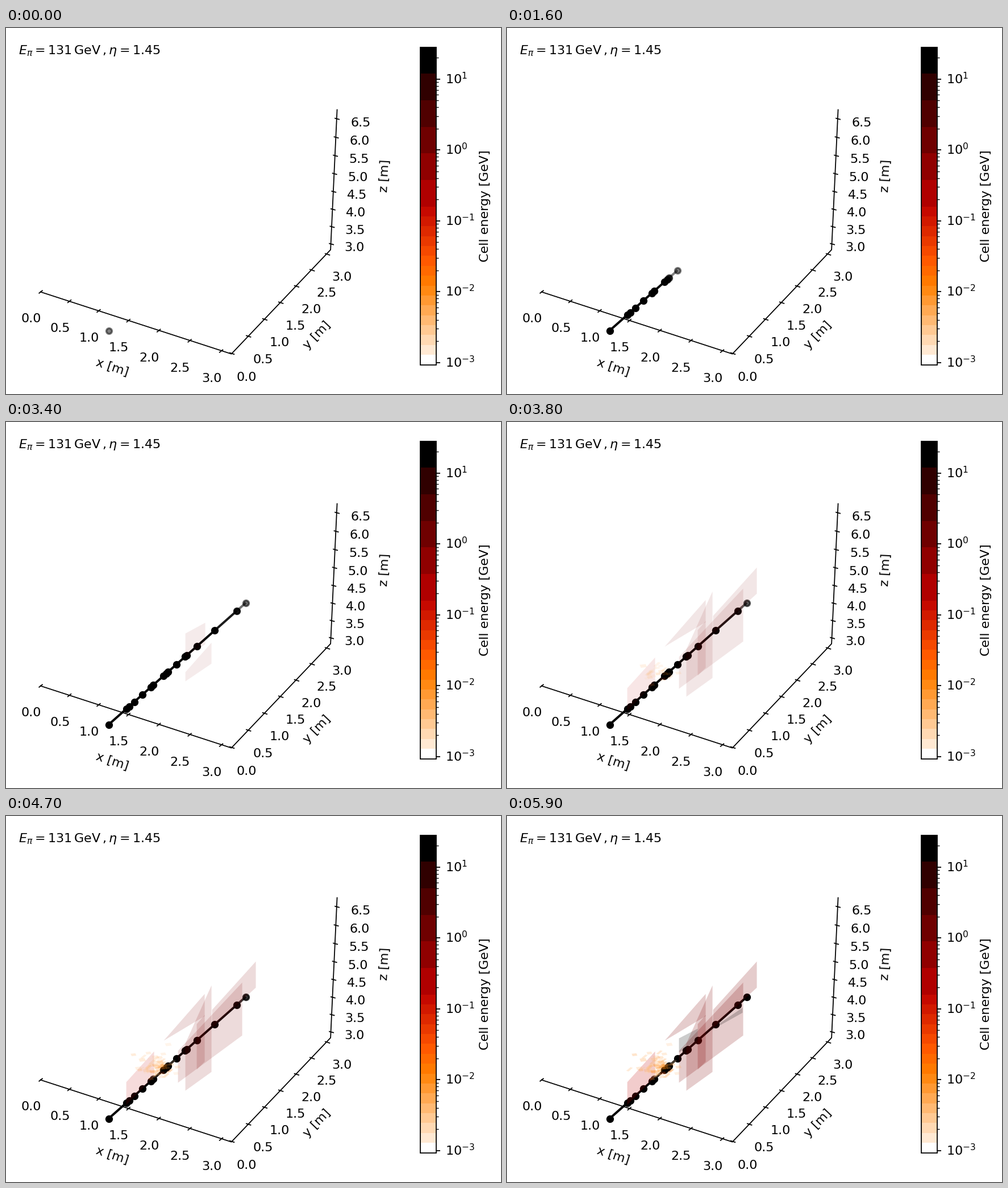
Animation of 871 by 643 pixels, one loop 6900 ms. Source, as a matplotlib script:

```python
import numpy as np
import matplotlib.pyplot as plt
from matplotlib.animation import FuncAnimation
from matplotlib.patches import Polygon, Rectangle

W, H, DPI = 871, 643, 160
FRAMES, LAST = 69, 59
STAGE = 7                     # steps per stage
CELLS_FROM = 31               # first step with cells

plt.rcParams["font.family"] = "DejaVu Sans"
plt.rcParams["font.size"] = 10
plt.rcParams["mathtext.fontset"] = "dejavusans"
heat = plt.get_cmap("gist_heat_r")

fig = plt.figure(figsize=(W / DPI, H / DPI), dpi=DPI, facecolor="white")
ax = fig.add_axes([0, 0, 1, 1])
ax.set_xlim(0.4, W + 0.4)
ax.set_ylim(H + 0.4, 0.4)
ax.axis("off")


def stroke(p, q, width=0.8, **kw):
    return ax.plot([p[0], q[0]], [p[1], q[1]], color="black", lw=width,
                   solid_capstyle="butt", **kw)


def mix(a, b, t):
    return (1 - t) * np.array(a, float) + t * np.array(b, float)


def draw_axis(ticks, numbers, values, depth, arm):
    """Ticks and numbers of one axis, spaced in perspective."""
    for t, value in zip(np.linspace(0, 1, len(values)), values):
        s = t / (depth + (1 - depth) * t)
        tick, (x, y) = mix(*ticks, s), mix(*numbers, s)
        stroke(tick - arm, tick + arm)
        ax.text(x, y + 8.2, f"{value:.1f}", ha="center", va="baseline")


def draw_axes():
    ax.plot([61, 397, 571.5, 583], [464, 573, 390, 144], color="black", lw=0.8)
    short, tall = np.arange(0, 3.1, 0.5), np.arange(3, 6.6, 0.5)
    draw_axis([(61.5, 464), (379, 568)], [(45, 509), (362, 614.5)],
              short, 1.058, np.array([3.5, -2.8]))
    draw_axis([(398, 572.3), (566, 398)], [(424, 612), (591, 436)],
              short, 0.953, np.array([4.6, 1.5]))
    draw_axis([(573, 380), (583, 160)], [(613, 384), (624.5, 165)],
              tall, 1.044, np.array([4.4, 1.2]))
    for x, y, name, angle in [(187, 597, "x", -18), (548, 540, "y", 46.3),
                              (667, 260, "z", 87.2)]:
        ax.text(x, y, f"{name} [m]", rotation=angle, ha="center", va="center",
                rotation_mode="anchor")
    ax.text(22, 46, r"$E_\pi = 131\,\mathrm{GeV}\,, \eta = 1.45$")


def draw_colorbar():
    left, right, top, bend, bottom = 729, 757, 34, 314, 592
    # fine colour steps below the bend, coarse ones above
    edges = np.r_[np.linspace(bottom, bend, 17), np.linspace(bend, top, 7)[1:]]
    for low, high in zip(edges, edges[1:]):
        t = (bottom - (low + high) / 2) / (bottom - top)
        t = 0.0 if low == bottom else 1.0 if high == top else t
        ax.add_patch(Rectangle((left, high), right - left, low - high,
                               fc=heat(t), lw=0, antialiased=False))
    ax.add_patch(Rectangle((left, top), right - left, bottom - top,
                           fc="none", ec="black", lw=0.8, zorder=2))
    decade = 124.5
    for n in range(-3, 2):
        y = 214.5 - decade * n
        stroke((right, y), (right + 7.8, y))
        ax.text(773, y + 8.4, f"$\\mathdefault{{10^{{{n}}}}}$", va="baseline")
        for minor in y - decade * np.log10(np.arange(2, 10)):
            if minor > top:
                stroke((right, minor), (right + 4.4, minor), 0.6)
    ax.text(843.5, 313, "Cell energy [GeV]", rotation=90, ha="center",
            va="center")


def build_track():
    """Hits on a straight line, four per stage."""
    along = [0, 0.128, 0.149, 0.186, 0.244, 0.308, 0.323, 0.398, 0.418, 0.433,
             0.495, 0.557, 0.569, 0.642, 0.772, 0.934, 1]
    hits = [mix((181, 532), (422.5, 318), s) for s in along]
    parts = []
    for i, hit in enumerate(hits):
        artists = ax.plot(*hit, "o", color="black", ms=20 ** 0.5, mew=1.5,
                          zorder=3)
        if i:
            artists += stroke(hits[i - 1], hit, 1.8, zorder=2)
        birth = STAGE * (i // 4) + round(STAGE * (i % 4 / 4) ** 1.5)
        parts.append((artists, birth))
    return parts


def cell(points, color, birth, death=FRAMES, peak=0.2):
    patch = Polygon(points, closed=True, fc=color, lw=0, zorder=4)
    ax.add_patch(patch)
    return patch, birth, death, peak


def plate(left, right, *style):
    """Upright cell face; each side is (x, top, bottom)."""
    (x0, top0, low0), (x1, top1, low1) = left, right
    return cell([(x0, low0), (x0, top0), (x1, top1), (x1, low1)], *style)


def large_cells():
    dark, full = "#800000", CELLS_FROM + 5
    return [
        plate((316, 372, 412), (351, 353, 391), dark, CELLS_FROM, full),
        plate((316, 440, 456), (362, 388, 425), dark, CELLS_FROM, full),
        plate((303, 413, 469), (416, 293, 386), dark, full),
        plate((278, 395, 395), (350, 313, 352), dark, full),
        plate((363, 341, 372), (440, 256, 302), dark, full + 2),
        plate((316, 400, 483), (362, 298, 450), dark, full + 2),
        plate((336, 366, 446), (350, 350, 432), dark, full + 2),
        plate((212, 468, 508), (261, 414, 458), "#c00000", full + 2),
        plate((303, 391, 416), (336, 374, 393), "black", 49),
        plate((345, 385, 385), (415, 337, 346), "black", 56),
    ]


def fine_cells(core=62, halo=9):
    """Small slanted cells: a dense core, then a few far hits."""
    rng = np.random.default_rng(8)
    cells = []
    for i in range(core + halo):
        if i < core:
            x = np.clip(rng.normal(268, 16), 236, 303)
            y = np.clip(rng.normal(441, 9), 420, 462)
            birth = rng.integers(35, 47)
        else:
            x, y = mix((216, 437), (286, 406), (i - core) / (halo - 1))
            y += rng.normal(0, 8)
            birth = rng.integers(45, 50)
        near = np.exp(-((x - 281) / 14) ** 2 - ((y - 449) / 9) ** 2)
        energy = rng.uniform(0.07, 0.2) + 0.18 * near
        u, v = ((7, -6), (4, 1)) if i % 3 == 2 else ((9, -1), (2, 4.5))
        u, v = rng.uniform(0.4, 0.62) * np.array([u, v])
        c = np.array([x, y])
        cells.append(cell([c - u - v, c + u - v, c + u + v, c - u + v],
                          heat(energy), birth, peak=0.28))
    return cells


draw_axes()
draw_colorbar()
track = build_track()
cells = large_cells() + fine_cells()


def update(frame):
    k = min(frame, LAST)
    late = max(0, k - CELLS_FROM + 1) / (LAST - CELLS_FROM + 1)
    for artists, birth in track:
        fade = 1 - 0.5 ** max(0, min(k, 4 * STAGE) - birth + 1)
        for artist in artists:
            artist.set_visible(k >= birth)
            artist.set_alpha(fade + (1 - fade) * late)
    for patch, birth, death, peak in cells:
        patch.set_visible(bool(birth <= k < death))
        patch.set_alpha(peak * (0.3 + 0.7 * late))
    return []


anim = FuncAnimation(fig, update, frames=FRAMES, interval=100, repeat=True,
                     repeat_delay=0, cache_frame_data=False)
plt.show()
```
